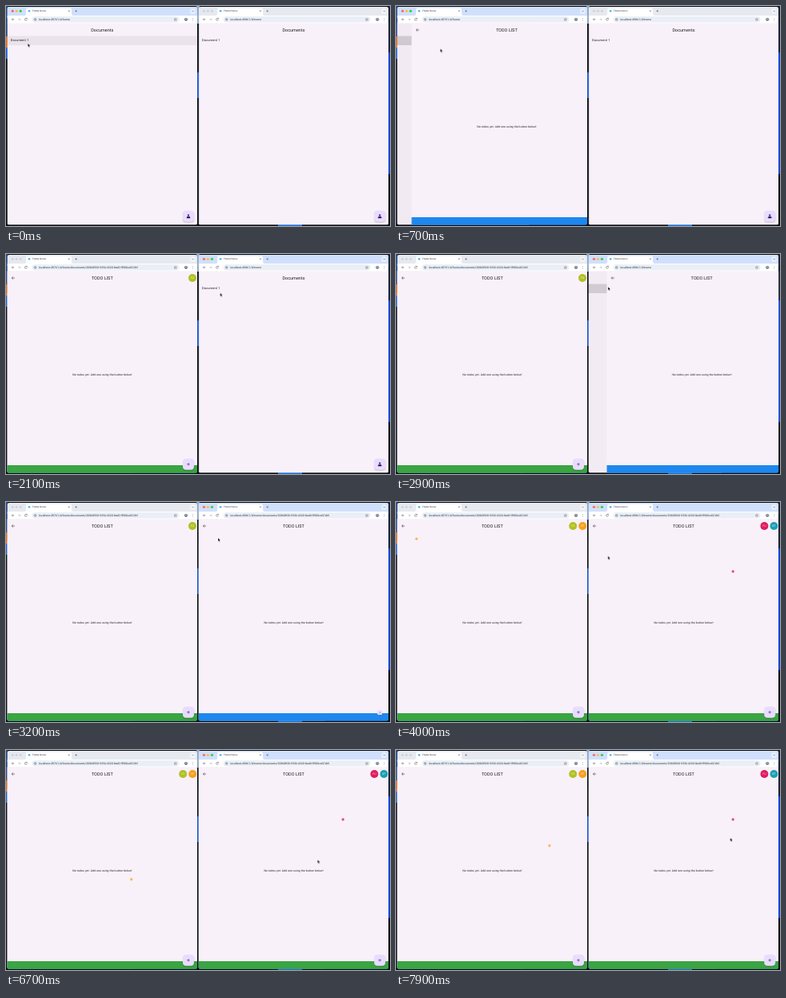
Write an HTML page that moves like this. It is 480 px wide and 275 px high and loops after 8000 ms.

```html
<!DOCTYPE html>
<html lang="en">
<head>
<meta charset="utf-8">
<title>Documents</title>
<style>
  html, body { margin: 0; width: 100%; height: 100%; overflow: hidden; background: #0b0d14; }
  svg { display: block; width: 100vw; height: 100vh; }
  text { font-family: Roboto, sans-serif; text-rendering: geometricPrecision; fill: #1d1b20; }
  .mid { text-anchor: middle; }
  .title { font-size: 5.5px; }
  .item { font-size: 4px; letter-spacing: .125px; }
  .note { font-size: 3.5px; letter-spacing: .06px; }
  .url { font-size: 3.5px; fill: #30343a; }
  .tab { font-size: 3px; fill: #30343a; }
  .badge text { font-size: 3.7px; fill: #fff; fill-opacity: .75; }
  .line { fill: none; stroke: #4a4d52; stroke-width: .5; }
  .fab { transform-box: fill-box; transform-origin: center; }
</style>
</head>
<body>
<svg id="stage" viewBox="0 0 480 275" preserveAspectRatio="none"></svg>
<script>
const LOOP = 8000;
const GAP = 239.2;
const PATH = '/documents/30868930-9356-4320-8ed0-ff980cd47d6f';

const rect = (x, y, w, h, fill, extra = '') =>
  `<rect x="${x}" y="${y}" width="${w}" height="${h}" fill="${fill}" ${extra}/>`;
const disc = (x, y, r, fill, extra = '') =>
  `<circle cx="${x}" cy="${y}" r="${r}" fill="${fill}" ${extra}/>`;
const label = (x, y, cls, s, extra = '') => `<text x="${x}" y="${y}" class="${cls}" ${extra}>${s}</text>`;
const line = (d, extra = '') => `<path class="line" d="${d}" ${extra}/>`;

const fab = (icon, id = '') => `<g class="fab" ${id && `id="${id}"`}>
  ${rect(220.6, 256.5, 15, 15, '#000', 'rx="4.4" opacity=".07"')}
  ${rect(221, 256.2, 14.2, 14.2, '#000', 'rx="4" opacity=".12"')}
  ${rect(221, 255.8, 14, 14, '#e9dcfe', 'rx="4"')}${icon}</g>`;

const person = disc(228, 261.5, 1.1, '#21005d') +
  '<path d="M225.8 265.2v-.7q0-1.4 2.2-1.4t2.2 1.4v.7z" fill="#21005d"/>';
const plus = line('M226.2 262.8h3.6M228 261v3.6', 'style="stroke:#21005d"');

const badge = (id, x, fill, s) => `<g class="badge" id="${id}">
  ${disc(x, 30, 5, fill)}${label(x, 31.3, 'mid', s)}</g>`;

function chrome(k, port) {
  const lights = ['#fe5f57', '#febc2e', '#28c840'];
  const row = fill => lights.map((c, i) => disc(8.2 + 5 * i, 6.3, 1.5, fill || c)).join('');
  return `
    ${rect(1.5, 1, 237.5, 14, '#e6e9ef')}${row('#cfd2d8')}
    <g id="focus${k}">${rect(1.5, 1, 237.5, 14, '#d0e0fc')}${row()}</g>
    <path d="M23 12q2 0 2-2V4.5q0-2 2-2h53q2 0 2 2V10q0 2 2 2z" fill="#fff"/>
    ${disc(29, 6.3, 1.3, '#45b4ef')}
    ${label(33, 7.4, 'tab', 'Flutter Demo')}
    ${line('M78 5.4l1.7 1.7m0-1.7l-1.7 1.7M86.3 6.3h2.6M87.6 5v2.6')}
    ${rect(230, 3, 7, 7, '#fff', 'rx="2" opacity=".45"')}
    ${line('M232.5 5.9l1.1 1.1 1.1-1.1')}
    ${rect(1.5, 12, 237.5, 10, '#fff')}
    ${rect(32.5, 13, 184, 7.6, '#eaeff7', 'rx="3.8"')}
    ${line('M10.3 16.8H7.3l1.4-1.4m-1.4 1.4l1.4 1.4')}
    ${line('M15 16.8h3l-1.4-1.4m1.4 1.4l-1.4 1.4', 'opacity=".45"')}
    ${line('M26.1 15.8a1.5 1.5 0 1 0 .2 1.5M26.3 14.9v1.2h-1.2')}
    ${disc(36.5, 16.8, 1.3, 'none', 'class="line"')}${line('M36.5 16.4v1.1')}
    ${label(41, 18, 'url', `localhost:${port}/#/home`, `id="home${k}"`)}
    ${label(41, 18, 'url', `localhost:${port}/#/home${PATH}`, `id="deep${k}"`)}
    ${line('M211.8 15.1l.5 1.1 1.2.1-.9.8.3 1.2-1.1-.6-1.1.6.3-1.2-.9-.8 1.2-.1z', 'style="stroke-width:.4"')}
    ${disc(225, 16.8, 2, '#5c7184')}${disc(225, 16.2, .7, '#fff')}
    ${[15.4, 16.8, 18.2].map(y => disc(233.8, y, .35, '#4a4d52')).join('')}`;
}

function pages(k, badges, dot) {
  return `<g clip-path="url(#view)">
    <g id="list${k}">
      ${rect(1.5, 21.5, 237.5, 252, '#f9f1f9')}
      ${rect(1.5, 37.5, 237.5, 11.5, '#1d1b20', `id="row${k}" opacity="0"`)}
      ${label(120.3, 32, 'title mid', 'Documents')}
      ${label(5.7, 44.4, 'item', 'Document 1')}
      ${fab(person)}
    </g>
    ${rect(1.5, 21.5, 237.5, 252, '#000', `id="dim${k}" opacity="0"`)}
    <g id="todo${k}">
      ${rect(1.5, 21.5, 237.5, 252, '#f9f1f9')}
      ${line('M11 30H7.2l1.8-1.8M7.2 30l1.8 1.8', 'style="stroke:#1d1b20"')}
      ${label(120.3, 32, 'title mid', 'TODO LIST')}
      ${label(120.4, 151.7, 'note mid', 'No todos yet. Add one using the button below!')}
      ${rect(1.5, 264, 237.5, 10, '#1e88ee')}
      ${rect(1.5, 264, 237.5, 10, '#3ba443', `id="ok${k}"`)}
      ${fab(plus, 'add' + k)}${badges}
      ${disc(0, 0, 1.5, dot, `id="dot${k}"`)}
    </g></g>`;
}

const win = (k, port, badges, dot) => `<g transform="translate(${k * GAP})" clip-path="url(#frame)">
  ${chrome(k, port)}${pages(k, badges, dot)}</g>`;

document.getElementById('stage').innerHTML = `
  <defs>
    <clipPath id="frame">${rect(1.5, 1, 237.5, 272.7, '#000', 'rx="2.5"')}</clipPath>
    <clipPath id="view">${rect(1.5, 21.5, 237.5, 252.2, '#000')}</clipPath>
  </defs>
  ${rect(0, 0, 480, 275, '#0b0d14')}
  ${rect(0, 0, 2, 38, '#2a4a86')}${rect(0, 38, 2, 14, '#e0702c')}${rect(0, 52, 2, 14, '#1c5fd0')}
  ${rect(238, 0, 4, 22, '#8fa6c6')}${rect(238, 83, 4, 32, '#1d58c8')}
  ${rect(478, 0, 2, 58, '#1a2238')}${rect(478, 58, 2, 152, '#1546d8')}
  ${rect(340, 273, 30, 2, '#1f6fd6')}
  ${win(0, 49761, badge('own0', 233, '#b1c024', 'FU') + badge('peer0', 233.2, '#f9a01e', 'SP'), '#f9a825')}
  ${win(1, 49861, badge('own1', 221.2, '#df1b5c', 'FU') + badge('peer1', 233.2, '#1f9fb5', 'SP'), '#e91e63')}
  <path id="mouse" d="M0 0V4.3L1 3.4 1.7 4.9 2.5 4.5 1.8 3.1H3.1Z" fill="#000" stroke="#fff" stroke-width=".35"/>`;

// Keys are [ms, value, easing]; the first and last values are held.
function track(id, prop, keys, easing = 'linear') {
  const frames = keys.map(([t, v, e]) => ({ offset: t / LOOP, [prop]: v, easing: e || easing }));
  if (keys[0][0] > 0) frames.unshift({ ...frames[0], offset: 0, easing: 'linear' });
  frames.push({ ...frames[frames.length - 1], offset: 1 });
  document.getElementById(id).animate(frames, { duration: LOOP, iterations: Infinity });
}
const flip = (id, t, from = 0, to = 1) => track(id, 'opacity', [[0, from], [t, to]], 'step-end');
const move = (x, y = 0) => `translate(${x}px, ${y}px)`;

function push(k, start, ready) {
  const end = start + 500, ease = 'cubic-bezier(.2,.8,.2,1)';
  track('todo' + k, 'transform', [[start, move(238), ease], [end, move(0)]]);
  track('list' + k, 'transform', [[start, move(0), ease], [end, move(-79)]]);
  track('dim' + k, 'opacity', [[start, 0, ease], [end, .03]]);
  flip('ok' + k, ready);
  track('add' + k, 'transform', [[ready - 100, 'scale(0)', 'ease-out'], [ready + 80, 'scale(1)']]);
  flip('home' + k, ready - 100, 1, 0);
  flip('deep' + k, ready - 100);
}

push(0, 480, 980);
push(1, 2700, 3250);
track('row0', 'opacity', [[0, .06], [380, .06], [480, .16]]);
track('row1', 'opacity', [[2250, 0], [2300, .06], [2600, .06], [2700, .15]]);
flip('focus0', 1850, 1, 0);
flip('focus1', 1850);

flip('own0', 1050);
track('own0', 'transform', [[0, move(0)], [3350, move(-11.8)]], 'step-end');
flip('peer0', 3350);
flip('own1', 3350);
flip('peer1', 3350);

const trip = [
  [3500, 264.8, 67.5], [4150, 264.8, 67.5], [4450, 276, 86], [5000, 332.2, 172.5],
  [5500, 408.3, 199.5], [5900, 432, 206], [6400, 372, 168], [6850, 398, 122],
  [7200, 431, 141], [7500, 429, 113], [7700, 429, 113], [7800, 417.7, 109.8]
];
const toMove = ([t, x, y]) => [t, move(x, y)];
track('mouse', 'transform', [
  [0, 27.3, 46.8], [100, 27.3, 46.8], [200, 27, 46.2], [560, 27, 46.2], [1050, 125.4, 71],
  [1400, 125.4, 71], [1600, 181, 108], [1880, 267.6, 48.6], [2150, 267.6, 48.6],
  [2500, 265, 41], [3150, 265, 41], ...trip
].map(toMove));

// The remote pointer trails the mouse by half a second.
track('dot0', 'transform', trip.filter(p => p[0] <= 7300)
  .map(([t, x, y]) => toMove([t + 500, x - GAP, y - 21.5])));
flip('dot0', 3700);
track('dot1', 'transform', [[0, move(182, 86.7)]]);
flip('dot1', 3400);
</script>
</body>
</html>
```
